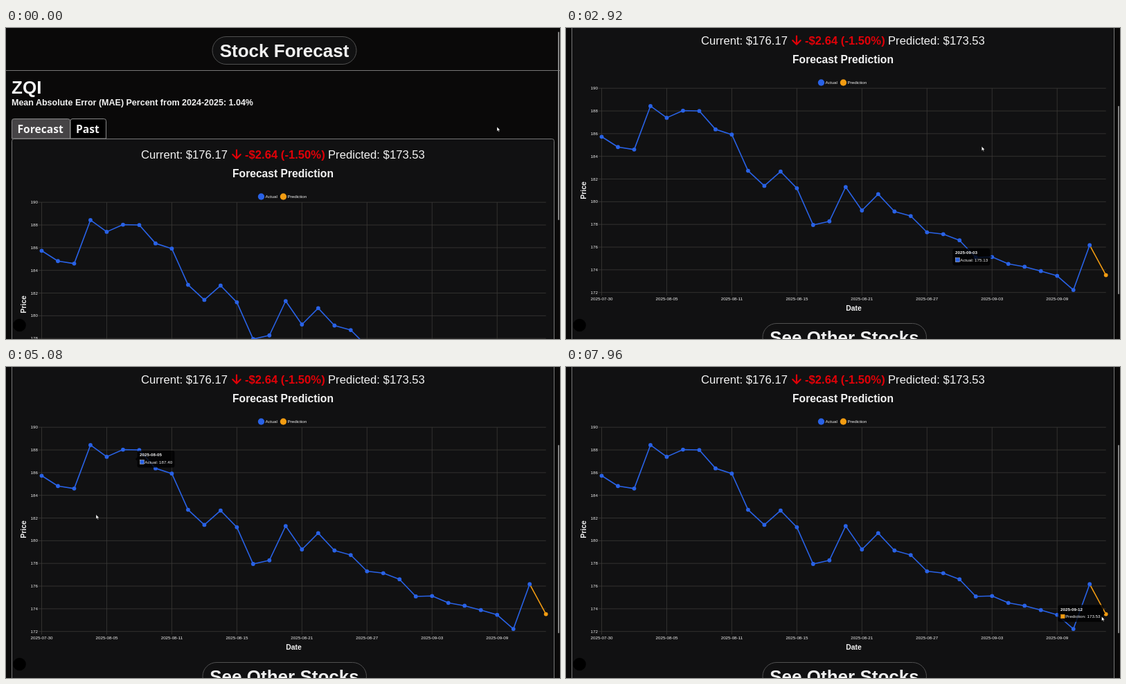
Recreate the animation shown at these times as an HTML page. Size 800 px wide and 450 px high, loop 8000 ms.

```html
<!DOCTYPE html>
<html lang="en">
<head>
<meta charset="utf-8">
<title>Stock Forecast</title>
<style>
  html, body { margin: 0; width: 100%; height: 100%; overflow: hidden; background: #0a0909; }
  svg { display: block; width: 800px; height: 450px; }
  text { font-family: "Liberation Sans", Arial, sans-serif; fill: #f2f2f2; white-space: pre; }
  .bold { font-weight: 700; }
  .tab { font-family: "Noto Sans", "Open Sans", sans-serif; font-weight: 700; font-size: 15.63px; }
  .small { font-size: 6.25px; }
  .mid { text-anchor: middle; }
  .end { text-anchor: end; }
</style>
</head>
<body>
<svg id="stage" viewBox="0 0 800 450"></svg>
<script>
const LOOP = 8000, STEP = 40;
const BLUE = '#2962e6', ORANGE = '#f39c12', RED = '#e10008';
const prices = [
  185.73, 184.82, 184.6, 188.43, 187.4, 188.03, 188, 186.38, 185.92, 182.73, 181.4,
  182.66, 181.19, 177.95, 178.27, 181.3, 179.23, 180.67, 179.14, 178.74, 177.31,
  177.14, 176.6, 175.09, 175.13, 174.52, 174.27, 173.89, 173.47, 172.22, 176.17, 173.53
];
const LAST = prices.length - 1;
const dates = tradingDays('2025-07-30', prices.length, '2025-09-01');

// Chart geometry, in page coordinates
const plot = { left: 51.5, right: 779.7, top: 252.2, bottom: 547.7 };
const gap = (plot.right - plot.left) / LAST;
const px = i => plot.left + i * gap;
const py = v => plot.top + (190 - v) * (plot.bottom - plot.top) / 18;

function tradingDays(start, count, holiday) {
  const days = [];
  for (const d = new Date(start + 'T00:00:00Z'); days.length < count; d.setUTCDate(d.getUTCDate() + 1)) {
    const iso = d.toISOString().slice(0, 10);
    if (d.getUTCDay() % 6 && iso !== holiday) days.push(iso);
  }
  return days;
}

function add(parent, tag, attrs = {}, content) {
  const node = document.createElementNS('http://www.w3.org/2000/svg', tag);
  for (const key in attrs) node.setAttribute(key, attrs[key]);
  if (content !== undefined) node.textContent = content;
  parent.appendChild(node);
  return node;
}
const label = (parent, x, y, content, cls, size, extra = {}) =>
  add(parent, 'text', { x, y, class: cls, ...(size && { 'font-size': size }), ...extra }, content);
const line = (parent, x1, y1, x2, y2, stroke, width = 1) =>
  add(parent, 'path', { d: `M${x1} ${y1}L${x2} ${y2}`, stroke, 'stroke-width': width, fill: 'none' });
const box = (parent, x, y, width, height, rx, fill, stroke = 'none') =>
  add(parent, 'rect', { x, y, width, height, rx, fill, stroke });
const dot = (parent, cx, cy, r, fill) => add(parent, 'circle', { cx, cy, r, fill });

const stage = document.getElementById('stage');
box(stage, 0, 0, 800, 450, 0, '#0a0909');
const page = add(stage, 'g');

function drawHeader() {
  box(page, 298, 12.5, 208, 40, 20, '#111112', '#505050');
  label(page, 402, 42, 'Stock Forecast', 'bold mid', 26.04);
  line(page, 0, 61.5, 800, 61.5, '#777');
  label(page, 8, 94.8, 'ZQI', 'bold', 26.04);
  label(page, 8, 112, 'Mean Absolute Error (MAE) Percent from 2024-2025: 1.04%', 'bold', 12.5);
}

function drawPanel() {
  box(page, 8.5, 160.5, 783, 520, 3, '#111112', '#777');
  const tab = (x, w, fill, name, tx) => {
    add(page, 'path', {
      d: `M${x} 160V134.5q0-3 3-3H${x + w - 3}q3 0 3 3V160z`, fill, stroke: '#8a8a8a'
    });
    label(page, tx, 151.5, name, 'tab');
  };
  tab(8.5, 84, '#464446', 'Forecast', 16.5);
  tab(93, 51.5, '#000', 'Past', 101);

  label(page, 195, 188.6, 'Current: $176.17', '', 16.67);
  add(page, 'path', {
    d: 'M333 176.5V188.5M327.3 183L333 188.8 338.7 183',
    stroke: RED, 'stroke-width': 2.2, fill: 'none', 'stroke-linecap': 'round', 'stroke-linejoin': 'round'
  });
  label(page, 345, 188.6, '-$2.64 (-1.50%)', 'bold', 16.67, { style: `fill:${RED}` });
  label(page, 465, 188.6, 'Predicted: $173.53', '', 16.67);
  label(page, 400, 216, 'Forecast Prediction', 'bold mid', 15.63);

  box(page, 284, 592.5, 236.5, 40, 20, '#111112', '#505050');
  label(page, 402, 621.5, 'See Other Stocks', 'bold mid', 26.04);
}

function drawChart() {
  const grid = '#3b3a38';
  dot(page, 368.5, 244, 4.7, BLUE);
  label(page, 374.5, 246.1, 'Actual', 'small');
  dot(page, 400.5, 244, 4.7, ORANGE);
  label(page, 406.5, 246.1, 'Prediction', 'small');

  for (let v = 172; v <= 190; v += 2) {
    line(page, 47, py(v), plot.right, py(v), grid, 0.8);
    label(page, 46, py(v) + 2.1, v, 'small end');
  }
  for (let i = 0; i <= LAST; i += 4) {
    line(page, px(i), plot.top, px(i), plot.bottom + 4.5, grid, 0.8);
    label(page, px(i), 558.9, dates[i], 'small mid');
  }
  label(page, 415.5, 574.2, 'Date', 'bold mid', 10.42);
  label(page, 0, 0, 'Price', 'bold mid', 10.42, { transform: 'translate(29 400) rotate(-90)' });

  line(page, px(LAST - 1), py(prices[LAST - 1]), px(LAST), py(prices[LAST]), ORANGE, 1.6);
  dot(page, px(LAST), py(prices[LAST]), 2.9, ORANGE);
  const actual = prices.slice(0, LAST);
  add(page, 'polyline', {
    points: actual.map((v, i) => `${px(i)},${py(v)}`).join(' '),
    fill: 'none', stroke: BLUE, 'stroke-width': 1.6, 'stroke-linejoin': 'round'
  });
  actual.forEach((v, i) => dot(page, px(i), py(v), 2.9, BLUE));
}

drawHeader();
drawPanel();
drawChart();

const tip = add(page, 'g');
const tipBack = box(tip, 0, 0, 54, 24.5, 3, 'rgba(0,0,0,.8)');
const tipCaret = add(tip, 'path', { fill: 'rgba(0,0,0,.8)' });
const tipTitle = label(tip, 3.6, 8.2, '', 'small bold');
const tipSwatch = add(tip, 'rect', { x: 4.2, y: 13.7, width: 5.6, height: 5.6, stroke: '#dfe6f5', 'stroke-width': 0.5 });
const tipText = label(tip, 10.8, 18.7, '', 'small');

const thumb = box(stage, 797, 0, 2, 272.5, 1, '#858585');
dot(stage, 19.5, 430, 9.3, '#000');
const cursor = add(stage, 'path', {
  d: 'M0 0V6.4L1.5 5.1 2.5 7.3 3.5 6.9 2.6 4.7H4.5z', fill: '#fff', stroke: '#000', 'stroke-width': 0.4
});

// Pointer path: time, x, y
const path = [
  [0, 709, 143], [840, 709, 143], [960, 489, 125.5], [1640, 489, 125.5], [1800, 625.5, 152.5],
  [2760, 625.5, 152.5], [3080, 575, 190], [3240, 575, 190], [3720, 463.5, 215],
  [4300, 350, 226], [4840, 240, 220], [5080, 130, 213.5], [5240, 66, 206], [5440, 66, 210],
  [5900, 210, 236], [6320, 431.5, 268], [6640, 590, 290], [7000, 690, 318],
  [7440, 715, 340], [7640, 773.5, 361], [LOOP, 773.5, 361]
];
const scrolls = [[840, 1164], [1780, 2024], [2440, 2760]];
const NOTCH = 55;

const clamp = v => Math.min(1, Math.max(0, v));
const smooth = p => p * p * (3 - 2 * p);

function pointerAt(t) {
  const n = Math.max(1, path.findIndex(k => k[0] >= t));
  const [a, b] = [path[n - 1], path[n]];
  const p = clamp((t - a[0]) / (b[0] - a[0]));
  return [a[1] + (b[1] - a[1]) * p, a[2] + (b[2] - a[2]) * p];
}

const scrollAt = t =>
  scrolls.reduce((sum, [from, to]) => sum + NOTCH * smooth(clamp((t - from) / (to - from))), 0);

function hoverAt(t) {
  const [x] = pointerAt(Math.max(0, t - 40));
  const i = Math.min(LAST, Math.max(0, Math.round((x - plot.left) / gap)));
  const width = i === LAST ? 65.5 : 54;
  const onRight = px(i) < (plot.left + plot.right) / 2;
  return { i, width, onRight, x: px(i) + (onRight ? 2.8 : -2.8 - width), y: py(prices[i]) - 12.3 };
}

// The tooltip trails the hovered point with an exponential delay.
function trailAt(t) {
  let x = 0, y = 0, total = 0;
  for (let age = 0; age <= 500; age += 20) {
    const weight = Math.exp(-age / 100);
    const spot = hoverAt(Math.max(2000, t - age));
    x += spot.x * weight;
    y += spot.y * weight;
    total += weight;
  }
  return [x / total, y / total];
}

function drawTip(t) {
  const { i, width, onRight } = hoverAt(t);
  const [x, y] = trailAt(t);
  const predicted = i === LAST;
  tip.setAttribute('opacity', clamp((t - 2520) / 200));
  tip.setAttribute('transform', `translate(${x} ${y})`);
  tipBack.setAttribute('width', width);
  tipCaret.setAttribute('d', onRight ? 'M0 9.6L-2.6 12.2 0 14.8z' : `M${width} 9.6l2.6 2.6-2.6 2.6z`);
  tipTitle.textContent = dates[i];
  tipSwatch.setAttribute('fill', predicted ? ORANGE : BLUE);
  tipSwatch.setAttribute('stroke', predicted ? ORANGE : '#dfe6f5');
  tipText.textContent = `${predicted ? 'Prediction' : 'Actual'}: ${prices[i].toFixed(2)}`;
}

function render(t) {
  const scroll = scrollAt(t);
  page.setAttribute('transform', `translate(0 ${-scroll})`);
  thumb.setAttribute('y', 5.5 + scroll * 0.65);
  cursor.setAttribute('transform', `translate(${pointerAt(t).join(' ')})`);
  drawTip(t);
}

const start = performance.now();
function tick() {
  const t = (performance.now() - start) % LOOP;
  render(Math.floor(t / STEP) * STEP);
  requestAnimationFrame(tick);
}
tick();
</script>
</body>
</html>
```
